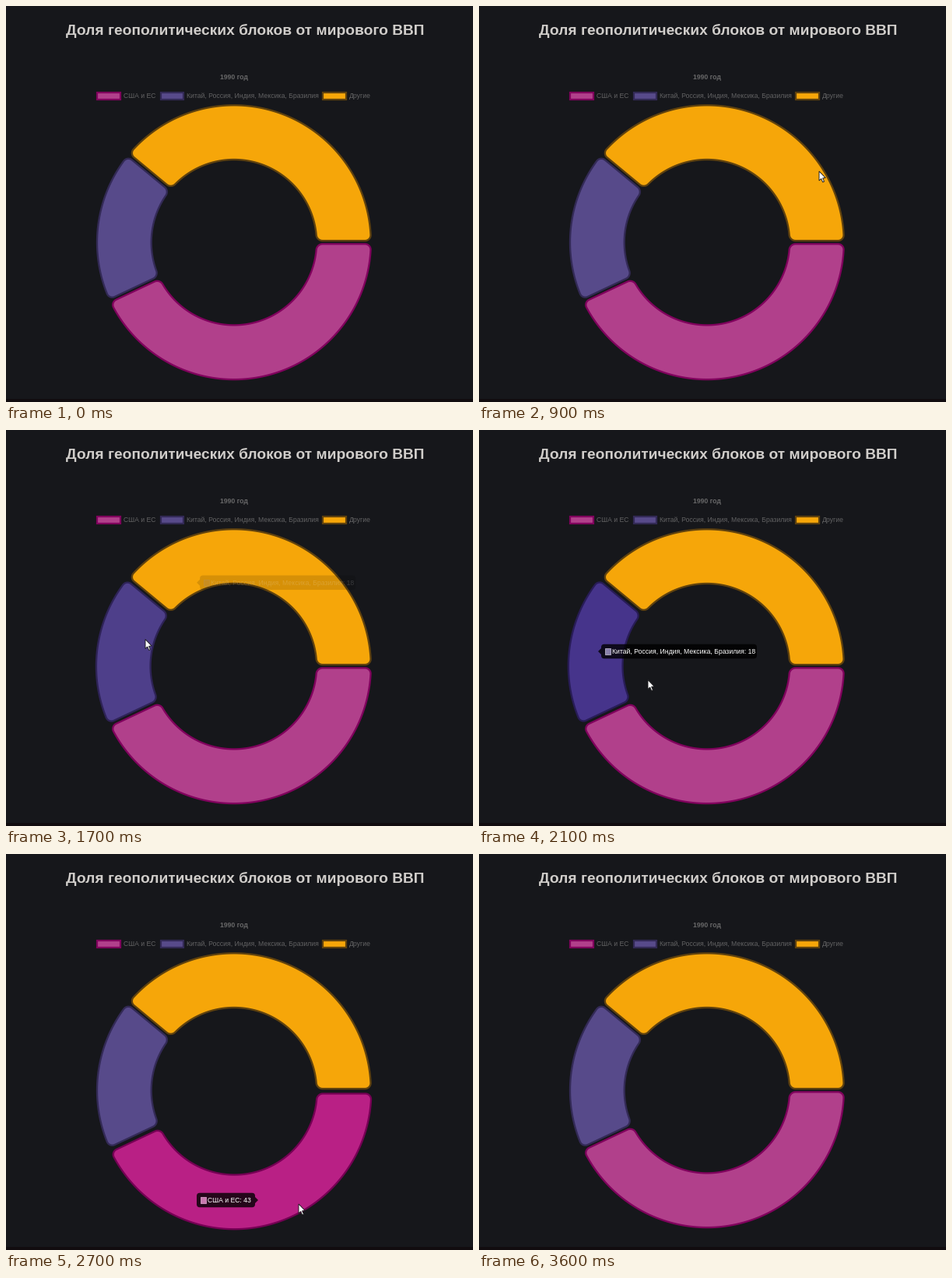
A matplotlib script for the animation above (3700 ms loop, 600 by 508 pixels).

```python
import colorsys

import matplotlib.pyplot as plt
import numpy as np
from matplotlib.animation import FuncAnimation
from matplotlib.patches import FancyBboxPatch, Polygon, Rectangle

W, H, DPI = 600, 508, 100
PX = 72 / DPI
STEP, LOOP = 100, 3700
CENTER = np.array([292.9, 303.2])
R_OUT, R_IN = 175.9, 106.2
GAP, ROUND = 2.1, 7.5
FONT = 8.6
GROW, MOVE, FADE = 150, 400, 150  # ms


def rgb(r, g, b):
    return np.array([r, g, b]) / 255


def hover_tone(color):
    h, l, s = colorsys.rgb_to_hls(*color)
    return np.array(colorsys.hls_to_rgb(h, l * 0.9, min(1, s * 1.5)))


def mix(a, b, k):
    return a + (b - a) * k


def ease(k):
    return 1 - (1 - np.clip(k, 0, 1)) ** 4


def polar(r, angle, shift=0):
    a = angle + shift / r
    return CENTER + r * np.stack([np.cos(a), np.sin(a)], -1)


def bend(p, c, q):
    t = np.linspace(0, 1, 10)[:, None]
    u, v = mix(p, c, 0.55), mix(q, c, 0.55)
    return (1 - t)**3 * p + 3 * (1 - t)**2 * t * u + 3 * (1 - t) * t**2 * v + t**3 * q


def corner(r, angle, side, inward):
    """Rounded corner running from the straight side onto the arc."""
    return bend(polar(r + inward * ROUND, angle, side * GAP),
                polar(r, angle, side * GAP),
                polar(r, angle, side * (GAP + ROUND)))


def arc(r, a0, a1):
    pad = (GAP + ROUND) / r
    return polar(r, np.linspace(a0 + pad, a1 - pad, 120))


def sector(a0, a1):
    return np.vstack([
        corner(R_OUT, a0, 1, -1), arc(R_OUT, a0, a1),
        corner(R_OUT, a1, -1, -1)[::-1], corner(R_IN, a1, -1, 1),
        arc(R_IN, a0, a1)[::-1], corner(R_IN, a0, 1, 1)[::-1],
    ])


# tip: left edge, middle and width of the tooltip; caret: side of its arrow
BLOCKS = [
    dict(name="США и ЕС", share=43, fill=rgb(177, 64, 139), edge=rgb(128, 2, 93),
         legend=116.5, on=2328, off=2865, tip=(245, 444, 75), caret=1),
    dict(name="Китай, Россия, Индия, Мексика, Бразилия", share=18,
         fill=rgb(87, 74, 138), edge=rgb(51, 42, 86),
         legend=198, on=1676, off=2100, tip=(157, 284, 200), caret=-1),
    dict(name="Другие", share=39, fill=rgb(246, 166, 9), edge=rgb(96, 66, 14),
         legend=406.5, on=902, off=1460, tip=(275, 171, 61), caret=1),
]
VISITS = sorted(BLOCKS, key=lambda b: b["on"])

# time, x, y of the pointer tip
PATH = np.array([
    (800, 586, 238), (900, 437, 212), (1200, 348, 186), (1450, 275, 200),
    (1600, 206, 249), (1700, 179, 268.5), (1900, 172, 283), (2000, 182, 298),
    (2100, 217, 320.5), (2300, 310, 398), (2400, 358, 428), (2800, 382, 456),
])
ARROW = np.array([(0, 0), (0, 12), (2.7, 9.5), (4.6, 14), (6.5, 13.2),
                  (4.6, 8.8), (8.2, 8.5)])

fig = plt.figure(figsize=(W / DPI, H / DPI), dpi=DPI)
BACK = rgb(22, 23, 27)
fig.patch.set_facecolor(BACK)
ax = fig.add_axes([0, 0, 1, 1])
ax.set_xlim(0, W)
ax.set_ylim(H, 0)
ax.axis("off")


def label(x, y, text, size, color, **kw):
    return ax.text(x, y, text, fontsize=size * PX, color=color,
                   family="Liberation Sans", va="baseline", **kw)


ax.add_patch(Rectangle((0, 504), W, 4, color=rgb(17, 12, 15), lw=0))
label(307.5, 37.2, "Доля геополитических блоков от мирового ВВП", 19.1,
      rgb(208, 205, 202), weight="bold", ha="center")
label(293, 94, "1990 год", FONT, rgb(104, 104, 105), weight="bold", ha="center")

start = 0
for b in BLOCKS:
    end = start + b["share"] / 100 * 2 * np.pi
    b["shape"] = sector(start, end)
    mid = (start + end) / 2
    b["push"] = 2.2 * np.array([np.cos(mid), np.sin(mid)])
    b["patch"] = ax.add_patch(Polygon(b["shape"], fc=b["fill"], ec=b["edge"],
                                      lw=2.3 * PX, joinstyle="round"))
    x = b["legend"]
    ax.add_patch(Rectangle((x + 0.5, 110.5), 29.5, 9, fc=b["fill"], ec=b["edge"],
                           lw=2.2 * PX, joinstyle="miter"))
    label(x + 34.2, 118, b["name"], FONT, rgb(98, 98, 99))
    start = end

tip_box = ax.add_patch(FancyBboxPatch(
    (0, 0), 10, 18.5, boxstyle="round,pad=0,rounding_size=4",
    fc="black", lw=0, zorder=5))
tip_caret = ax.add_patch(Polygon([(0, 0)] * 3, fc="black", lw=0, zorder=5))
tip_key = ax.add_patch(Rectangle((0, 0), 7.5, 7.5, lw=PX, zorder=6))
tip_text = label(0, 0, "", FONT, "white", zorder=6)
pointer = ax.add_patch(Polygon(ARROW, fc="white", ec=rgb(25, 25, 28),
                               lw=0.9 * PX, zorder=9))


def level(b, t):
    return ease((t - b["on"]) / GROW) * (1 - ease((t - b["off"]) / MOVE))


def draw_tip(t):
    seen = [b for b in VISITS if b["on"] <= t]
    alpha = 0
    if seen:
        b = seen[-1]
        alpha = np.clip(min((t - b["on"]) / FADE, 1 - (t - b["off"]) / FADE), 0, 1)
    parts = (tip_box, tip_caret, tip_key, tip_text)
    for p in parts:
        p.set_visible(alpha > 0)
    if alpha == 0:
        return
    prev = seen[-2] if len(seen) > 1 else b
    width = b["tip"][2]
    x, y = mix(np.array(prev["tip"][:2]), np.array(b["tip"][:2]),
               ease((t - b["on"]) / MOVE))
    tip_box.set_bounds(x, y - 9.25, width, 18.5)
    side = b["caret"]
    base = x + width if side > 0 else x
    tip_caret.set_xy([(base, y - 4), (base + side * 4, y), (base, y + 4)])
    tip_key.set_xy((x + 4.8, y - 3.6))
    tip_key.set_facecolor(mix(b["fill"], np.ones(3), 0.3))
    tip_key.set_edgecolor(mix(b["edge"], np.ones(3), 0.55))
    tip_text.set_position((x + 13.9, y + 3))
    tip_text.set_text(f"{b['name']}: {b['share']}")
    for p in parts:
        p.set_alpha(alpha * (0.8 if p in (tip_box, tip_caret) else 1))


def draw(i):
    t = i * STEP
    for b in BLOCKS:
        k = level(b, t)
        b["patch"].set_xy(b["shape"] + k * b["push"])
        b["patch"].set_facecolor(mix(b["fill"], hover_tone(b["fill"]), k))
        b["patch"].set_edgecolor(mix(b["edge"], hover_tone(b["edge"]), k))
    draw_tip(t)
    pointer.set_visible(bool(PATH[0, 0] <= t <= PATH[-1, 0]))
    tip = [np.interp(t, PATH[:, 0], PATH[:, c]) for c in (1, 2)]
    pointer.set_xy(ARROW + tip)
    return []


anim = FuncAnimation(fig, draw, frames=LOOP // STEP, interval=STEP,
                     init_func=lambda: draw(0), repeat=True, repeat_delay=0)
plt.show()
```
